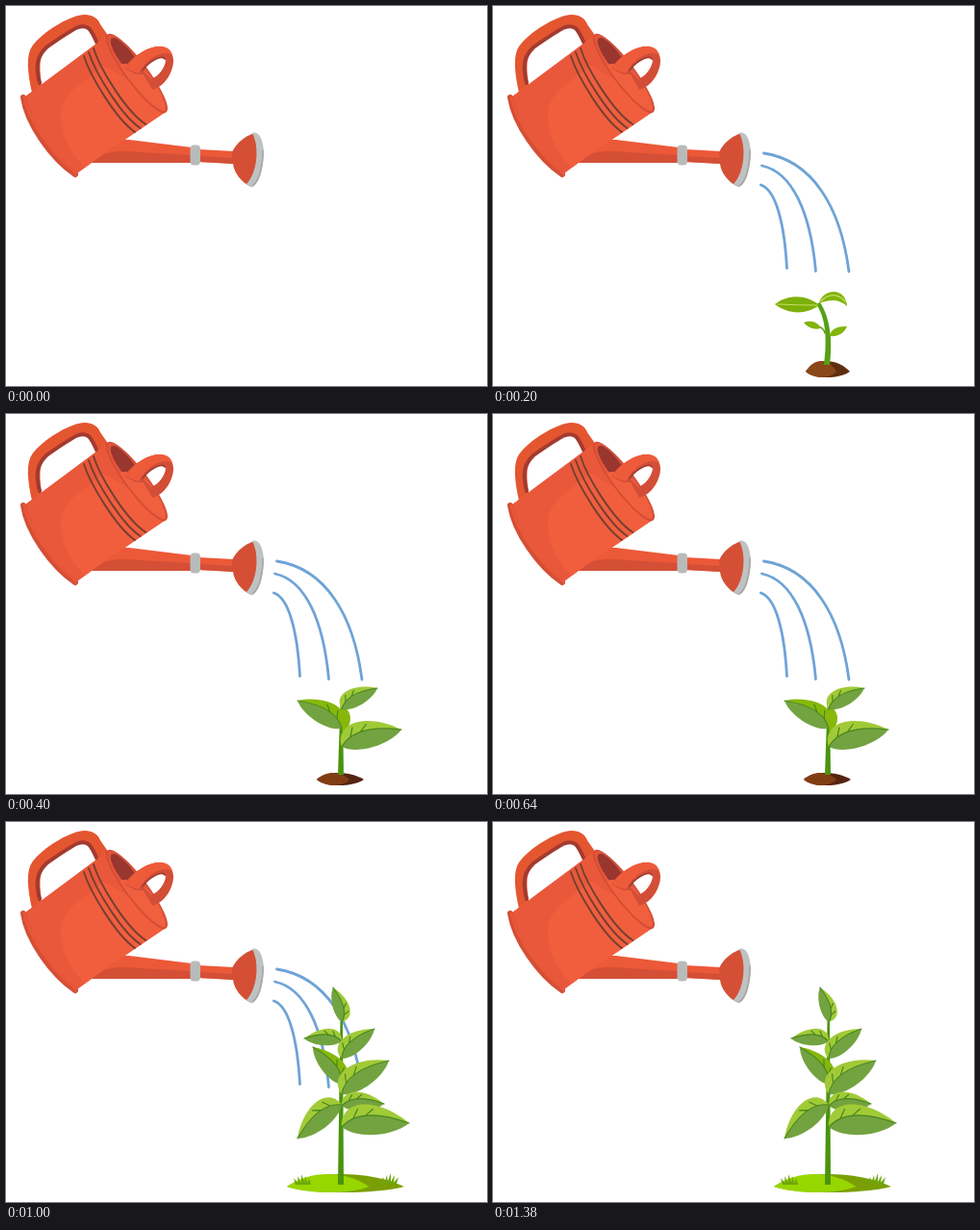
Recreate the animation shown at these times as an HTML page. Size 500 by 395 pixels, loop 1500 ms.

```html
<!DOCTYPE html>
<html lang="en">
<head>
<meta charset="utf-8">
<title>Watering a plant</title>
<style>
  html, body { margin: 0; width: 100%; height: 100%; overflow: hidden; background: #fff; }
  svg { display: block; width: 100vw; height: 100vh; }
  .line { fill: none; stroke-linecap: round; stroke-linejoin: round; }
</style>
</head>
<body>
<svg id="stage" viewBox="0 0 500 395" preserveAspectRatio="none">
  <g id="can">
    <!-- back handle -->
    <path fill="#e4562f" d="M27 90C22 68 21 51 27 42C37 28 60 14 75 10C86 7 95 11 98 19L107 32L96 44L88 27C84 21 76 21 68 25L45 42C35 50 34 58 37 83Z"/>
    <path class="line" stroke="#a33a31" stroke-width="4" d="M35 80C30 60 33 52 42 43C52 36 66 26 75 22C86 19 88 24 95 39"/>
    <!-- spout -->
    <path fill="#ec5938" d="M89 163C94 149 108 138 128 139L193 147V163ZM200 149L237 151V164L200 162Z"/>
    <path fill="#d44f36" d="M89 163C99 151 118 149 138 152L193 155V163ZM200 156L237 158V164L200 162Z"/>
    <!-- body -->
    <path fill="#e9583a" d="M20 94L106 30L166 110L97 157L74 174C48 157 28 130 20 94Z"/>
    <path fill="#f15e3e" d="M57 110C59 90 82 78 101 62L128 77C143 92 156 104 166 110L97 157L82 168C63 149 56 128 57 110Z"/>
    <!-- mouth -->
    <g transform="translate(136 70) rotate(53.100)">
      <ellipse rx="50" ry="11" fill="#e2553a"/>
      <ellipse cx="-18" cy="-1" rx="27" ry="7.500" fill="#98362f"/>
      <path fill="#f0603f" d="M-18 9C-13 -6 10 -13 30 -8C41 -5 47 -2 48 0C42 8 5 12 -18 9Z"/>
      <ellipse class="line" rx="50" ry="11" stroke="#d04b34" stroke-width="1.300"/>
    </g>
    <!-- front handle -->
    <path fill="#d24e37" fill-rule="evenodd" d="M123 65C133 50 149 42 160 42C173 43 177 55 172 67C169 76 161 85 152 87L143 71L135 71ZM142 67L151 76C159 73 165 64 166 57C164 50 148 57 142 67Z"/>
    <path fill="#ee5b3a" d="M123 65C133 50 149 42 160 42C168 42 172 46 173 52C164 43 145 55 138 70Z"/>
    <path class="line" stroke="#a33a31" stroke-width="1.500" d="M142 67C148 58 162 50 165 55"/>
    <!-- base rim -->
    <path class="line" stroke="#d44f36" stroke-width="6" d="M18 95C22 122 47 158 72 175"/>
    <path class="line" stroke="#ec5938" stroke-width="2" d="M19 95C24 121 49 156 73 174"/>
    <!-- collar and rose -->
    <rect x="191.500" y="144.500" width="10.500" height="21" rx="4" fill="#b9bbbb"/>
    <path fill="#d44f36" d="M235 152C239 143 247 136 258 132C267 146 264 173 253 187C245 183 237 174 236 164Z"/>
    <path fill="#bfc2c2" d="M256 132C263 129 268 140 268 154C267 175 261 189 254 188L250 185C261 174 264 147 256 132Z"/>
    <path class="line" stroke="#a4a7a7" stroke-width="1.500" d="M267 150C267 170 262 183 256 187"/>
  </g>
</svg>
<script>
  const LOOP = 1500, STEM_X = 349;
  const stage = document.getElementById('stage');
  const start = document.timeline.currentTime || 0;

  function add(parent, tag, attrs) {
    const el = document.createElementNS('http://www.w3.org/2000/svg', tag);
    for (const key in attrs) el.setAttribute(key, attrs[key]);
    parent.append(el);
    return el;
  }
  const fill = (g, d, color) => add(g, 'path', { d, fill: color });
  const line = (g, d, color, width) =>
    add(g, 'path', { d, class: 'line', stroke: color, 'stroke-width': width });

  // A group that is visible only between two times of the loop.
  function scene(from, to) {
    const g = add(stage, 'g', {});
    const step = (time, opacity) => ({ offset: time / LOOP, opacity, easing: 'step-end' });
    const steps = [step(0, 0), step(from, 1), step(to, 0)];
    if (to < LOOP) steps.push(step(LOOP, 0));
    g.animate(steps, { duration: LOOP, iterations: Infinity }).startTime = start;
    return g;
  }

  // An arched leaf from the stem to its tip; all curves follow from that axis.
  function leaf(g, baseY, tipX, tipY, { full = 1, light = '#a1ca37' } = {}) {
    const dx = tipX - STEM_X, dy = tipY - baseY, side = Math.sign(dx);
    const at = (along, up) => [
      STEM_X + dx * along + side * dy * up * full,
      baseY + dy * along - side * dx * up * full
    ].map(v => v.toFixed(1)).join(' ');
    const base = at(0, 0), tip = at(1, 0), rib = at(0.3, 0.3);
    fill(g, `M${base}C${at(0, 0.42)} ${at(0.55, 0.42)} ${tip}Q${rib} ${base}Z`, light);
    fill(g, `M${base}Q${rib} ${tip}C${at(0.75, -0.19)} ${at(0.2, -0.19)} ${base}Z`, '#73a340');
    line(g, `M${base}Q${rib} ${tip}M${at(0.18, 0.12)}L${at(0.25, 0.25)}M${at(0.36, 0.15)}L${at(0.48, 0.24)}`,
      '#47861d', 1.2);
  }

  const stem = (g, bottom, top) =>
    fill(g, `M${STEM_X - 4} ${bottom}L${STEM_X - 1.5} ${top}h2.500L${STEM_X + 2} ${bottom}Z`, '#4b930d');

  // Flat heap of earth or grass, lighter on its left part.
  function mound(g, left, right, y, rise, light, dark) {
    const w = right - left, h = rise * 1.33;
    const heap = (end, color) => fill(g,
      `M${left} ${y}C${left + w * 0.2} ${y - h} ${left + end * 0.7} ${y - h} ${left + end} ${y}` +
      `C${left + end * 0.75} ${y + 8} ${left + w * 0.2} ${y + 8} ${left} ${y}Z`, color);
    heap(w, dark);
    heap(w * 0.7, light);
  }

  function tuft(g, x, y, lean) {
    for (let i = -2; i <= 2; i++) {
      const height = 11 - Math.abs(i) * 2;
      fill(g, `M${x + i * 3 - 2} ${y}L${x + i * 4 + lean} ${y - height}L${x + i * 3 + 2} ${y}Z`, '#6fa50b');
    }
  }

  function stream(g, x, y, endX, endY) {
    const at = (u, v) => `${x + (endX - x) * u} ${y + (endY - y) * v}`;
    line(g, `M${x} ${y}C${at(0.56, 0.06)} ${at(0.9, 0.44)} ${endX} ${endY}`, '#6fa3d6', 2.8);
  }

  const can = document.getElementById('can');
  for (let i = 0; i < 3; i++) {
    const x = 81 + i * 5, y = 52 - i * 4;
    line(can, `M${x} ${y}c7 22 34 66 ${53 + i * 0.7} 79`, '#743f31', 1.9);
  }

  const water = scene(200, 1200);
  stream(water, 281.5, 153, 370, 276);
  stream(water, 279.5, 166, 335.5, 275.5);
  stream(water, 278.5, 186, 305.5, 272.5);

  const sprout = scene(100, 400);
  mound(sprout, 325, 371, 380, 11, '#8a4717', '#612d10');
  fill(sprout, 'M344 373C347 350 347 326 336 310L340 308C351 325 353 350 350 373Z', '#56a014');
  line(sprout, 'M338 333Q344 335 345 340M354 341Q349 342 348 348', '#5a9c16', 1.5);
  fill(sprout, 'M293 310C307 299 327 300 339 311C326 321 307 321 293 310Z', '#7db00a');
  fill(sprout, 'M339 309C343 293 367 292 368 312C359 304 351 305 339 309Z', '#82b40a');
  fill(sprout, 'M323 329C331 326 338 329 341 335C333 337 327 334 323 329Z', '#82b40a');
  fill(sprout, 'M368 333C357 333 351 336 350 343C359 344 365 340 368 333Z', '#82b40a');
  line(sprout, 'M296 310Q317 311 337 311M341 307C349 298 359 299 366 307', '#c3dc62', 1.2);

  const bright = '#87b80b';

  const young = scene(400, 800);
  mound(young, 323, 372, 380, 7, '#823d14', '#542510');
  stem(young, 375, 303);
  fill(young, 'M349 303C359 308 362 319 351 333C347 324 347 313 349 303Z', bright);
  leaf(young, 327, 303, 298, { light: bright });
  leaf(young, 307, 386, 285);
  leaf(young, 346, 411, 328);

  const tall = scene(800, 1000);
  mound(tall, 317, 385, 378, 7, '#7b3a14', '#542510');
  tuft(tall, 326, 378, -2);
  line(tall, 'M307 206h10', '#dcdfb4', 1);
  stem(tall, 379, 232);
  leaf(tall, 236, 316, 205);
  leaf(tall, 257, 382, 225);
  leaf(tall, 281, 392, 252, { full: 1.3, light: bright });
  leaf(tall, 313, 301, 275);
  leaf(tall, 333, 311, 313);
  leaf(tall, 325, 413, 311);

  const grown = scene(1000, LOOP);
  mound(grown, 292, 414, 379, 13, '#98d600', '#7a9f05');
  tuft(grown, 309, 377, -2);
  tuft(grown, 398, 376, 2);
  stem(grown, 377, 206);
  leaf(grown, 208, 340, 172);
  leaf(grown, 228, 310, 225);
  leaf(grown, 246, 383, 215);
  leaf(grown, 273, 319, 234, { light: bright });
  leaf(grown, 283, 398, 248);
  leaf(grown, 294, 303, 329);
  leaf(grown, 295, 393, 293);
  leaf(grown, 317, 419, 313);
</script>
</body>
</html>
```
